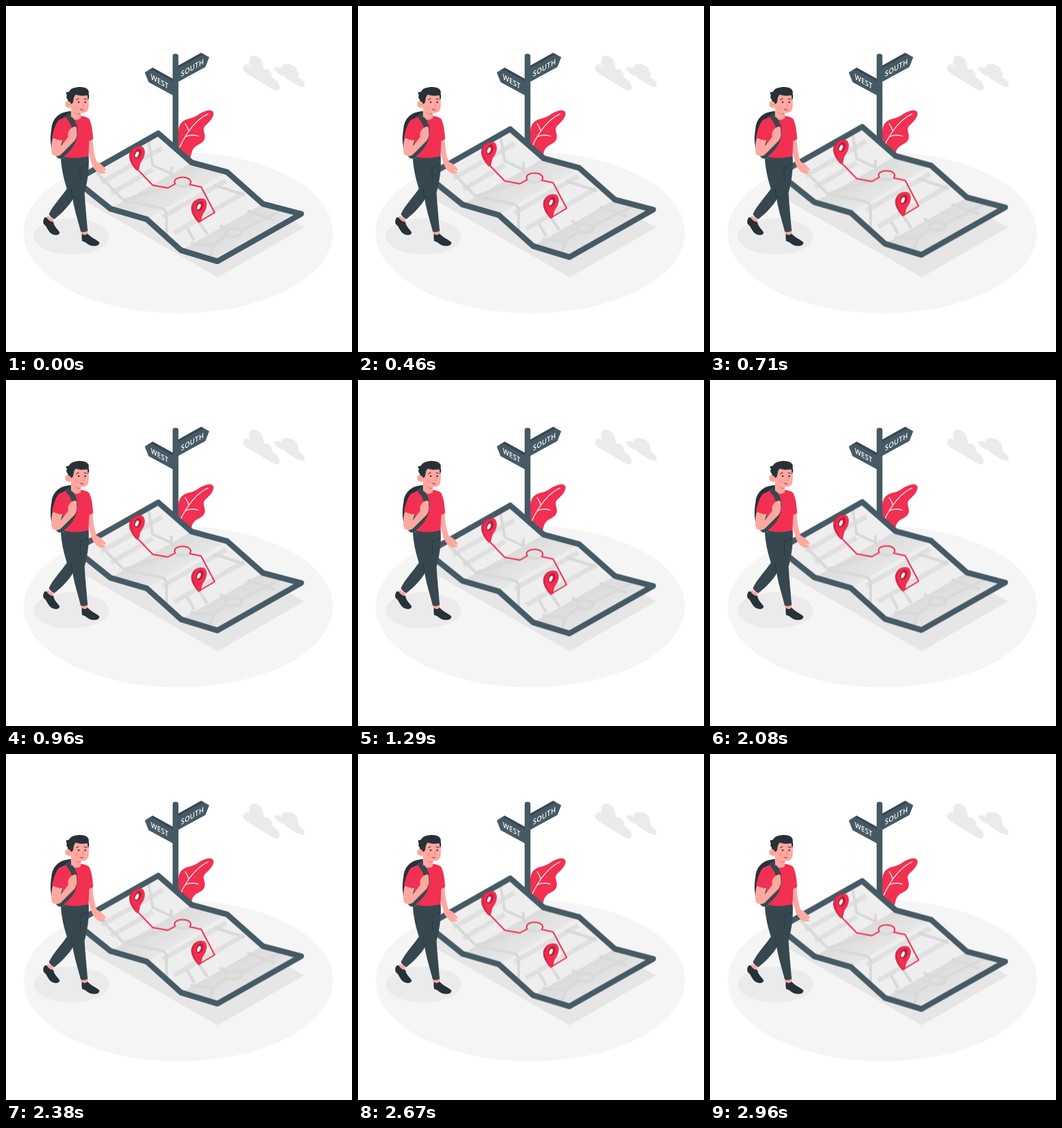
Animation, 500 px wide and 500 px high, one loop 3 s. Source, as an HTML page:

```html
<!DOCTYPE html>
<html lang="en">
<head>
<meta charset="utf-8">
<title>Traveller and map</title>
<style>
  :root {
    --red: #f23051;
    --wine: #b8203e;
    --slate: #455a64;
    --dark: #37474f;
    --ink: #263238;
    --skin: #ffa8a0;
    --blush: #f28f8f;
  }
  html, body { margin: 0; width: 100%; height: 100%; overflow: hidden; background: #fff; }
  svg { display: block; width: 100%; height: 100%; }
  .line { fill: none; stroke-linecap: round; stroke-linejoin: round; }
  .roads { stroke: #d9d9d9; stroke-width: 4; stroke-linecap: butt; }
  .avenues { stroke: #e0e0e0; stroke-width: 7; stroke-linecap: butt; }
  .route { stroke: var(--red); stroke-width: 2; }
  .border { stroke: var(--slate); stroke-width: 8.2; }
  .veins { stroke: #fff; stroke-width: 1.2; }
  .face-line { stroke: var(--ink); stroke-width: 1; }
  .crease { stroke: var(--ink); stroke-width: .8; }
  .red { fill: var(--red); }
  .slate { fill: var(--slate); }
  .dark { fill: var(--dark); }
  .ink { fill: var(--ink); }
  .skin { fill: var(--skin); }
  .cloud { fill: #ebebeb; }
  text { font: 600 10.8px "Open Sans", "Noto Sans", sans-serif; letter-spacing: .3px; fill: #fff; }

  #map { animation: float 1.5s linear infinite; }
  @keyframes float {
    50% { transform: translateY(-10px); }
  }
</style>
</head>
<body>
<svg viewBox="0 0 500 500">
  <defs>
    <linearGradient id="foldNear" gradientUnits="userSpaceOnUse" x1="209" y1="259" x2="236" y2="306">
      <stop offset="0" stop-color="#dcdcdc"/>
      <stop offset="1" stop-color="#ebebeb"/>
    </linearGradient>
    <linearGradient id="foldFar" gradientUnits="userSpaceOnUse" x1="312" y1="319" x2="340" y2="367">
      <stop offset="0" stop-color="#dcdcdc"/>
      <stop offset="1" stop-color="#e9e9e9"/>
    </linearGradient>
    <path id="sheet" d="M100 252L220 184L268.500 226.300L319.500 240L371.300 286L426.500 300.500L305.500 369L253 353L203.500 308.200L151 293Z"/>
    <g id="pin">
      <path fill="#d92849" d="M189 238C181 230 176 220 178.800 212C182 204.500 190 200.500 197 203.500L199 206L192 236Z"/>
      <path class="red" d="M190 238C185 229 179.500 220 182.500 212C185.500 205 193 201 198 204C202 208 201 216 198 221C194.500 226.500 191 231 190 238Z"/>
      <ellipse fill="var(--wine)" cx="190.500" cy="213.500" rx="5" ry="7.600" transform="rotate(24 190.500 213.500)"/>
      <ellipse fill="#fff" cx="189.300" cy="214.500" rx="2.200" ry="4.400" transform="rotate(24 189.300 214.500)"/>
    </g>
  </defs>

  <!-- Ground -->
  <ellipse cx="249" cy="327.500" rx="223.500" ry="116.500" fill="#f5f5f5"/>
  <ellipse cx="94.500" cy="333" rx="54.500" ry="26" fill="#ebebeb"/>
  <path fill="#e6e6e6" d="M95 271L220 200L430.500 320L306 392Z"/>

  <!-- Clouds -->
  <path class="cloud" d="M343 91C342 84 348 83 352 86C350 77 353 70 361 72C369 74 372 84 373 92C379 90 385 95 385 104C392 107 397 115 395 121C392 124 385 120 380 117L347 97C344 95 343 93 343 91Z"/>
  <path class="cloud" d="M388 89C391 87 395 88 398 91C397 86 402 83 408 84C418 85 424 93 423 104C428 106 432 110 431.500 115C430 119 424 116 420 114L405 105C403 101 399 101 396 99C391 97 388 93 388 89Z"/>

  <!-- Leaf -->
  <path class="red" d="M249 222L249 182C249 172 254 165 264 163C275 161 280 154 288 152C294 150 300 150 300 156C299 163 293 168 287 174C283 179 289 185 287 192C285 199 275 200 271 206C268 210 268 216 265 222Z"/>
  <path class="line veins" d="M251 204C259 187 272 165 292 156M264 181Q263 176 259 170M259 189Q268 185 278 188"/>

  <!-- Signpost -->
  <path class="slate" d="M240.800 72Q241 69 245 69Q249 69 249.200 72V215H240.800Z"/>
  <path class="dark" d="M249 86L282 67.500L293.500 74L288 88L249 109Z"/>
  <path class="slate" d="M249 89.500L284 70.500L293.500 74L288 88L249 109.500Z"/>
  <path class="dark" d="M200.500 96L212 89L241 105V110L211 93Z"/>
  <path class="slate" d="M200.500 96L211 92.500L241 109V129L206 110Z"/>
  <text transform="matrix(.87 -.5 0 1 252.800 102.500)">SOUTH</text>
  <text transform="matrix(.87 .5 0 1 209.300 105.500)">WEST</text>

  <g id="map">
    <use href="#sheet" fill="#eee"/>
    <path fill="url(#foldNear)" d="M268.500 226.300L319.500 240L203.500 308.200L151 293Z"/>
    <path fill="url(#foldFar)" d="M371.300 286L426.500 300.500L305.500 369L253 353Z"/>
    <path class="line avenues" d="M138 255L226 205M152 271L212 236M226 305L318 252M243 328L344 270"/>
    <g class="line roads">
      <path d="M131 241L170 281L224 292Q232 294 232 302V330"/>
      <path d="M206 195L212 230L238 242L245 249M239 232V244"/>
      <path d="M170 281L244 258M262 321L272 339M278 311L291 330M301 259L345 273"/>
      <path d="M309 317L320 323M340 324L398 295M349 296L389 310M318 333L300 345L295 362M267 343L300 346"/>
      <ellipse cx="328.500" cy="327.500" rx="11.500" ry="6"/>
      <path d="M244 256C246 262 263 262 266 257"/>
    </g>
    <use href="#sheet" class="line border"/>
    <path class="line route" d="M190 236L212 259L234 263L244.500 257C241 251 248 247.500 255 247.500C263 247.500 270 252 265.500 258L282 261.500L301.500 298.500L279 312"/>
    <use href="#pin"/>
    <use href="#pin" x="89.500" y="75.500"/>
  </g>

  <g id="traveller">
    <!-- Backpack -->
    <path class="dark" d="M97 152C80 151 68 160 66 176C63 190 64 205 69 213L80 220L100 208L102 160Z"/>
    <path class="ink" d="M93 153C78 153 67 162 66 177C65 189 64 200 67 209L73 205C70 190 72 172 80 163Z"/>

    <!-- Legs -->
    <path class="skin" d="M60 303L69 308L67 314L58 310Z"/>
    <path class="skin" d="M108 323L117.500 322L118.500 331L109 332Z"/>
    <path class="ink" d="M55.500 306Q58.500 304 60.500 308Q64 312 68.500 312C69.500 319 74.500 322 77.500 327C77.500 331 72.500 332 67.500 330C60.500 327 60 319 54.500 315Q52.500 311 55.500 306Z"/>
    <path class="ink" d="M110 329Q113.500 333 118 329C122 334 130.500 337.500 135 341.500C135 346.500 129 347.500 124 346.500C118 345.500 116 341 110 339.500Q108.500 334 110 329Z"/>
    <path class="dark" d="M79 217C80 237 84 251 88 264C80 276 67 289 62 301Q65 306 70 308C81 299 92 288 98 277L113 240Z"/>
    <path class="dark" d="M80 217L119.500 217C120.500 234 118.500 250 113.500 270C114.500 288 116.500 307 118 325Q113 328 108 326C104 309 98 293 96 276C92 258 90 240 87 223Z"/>
    <path class="line crease" d="M118 229Q108 230 107 236Q107 246 108 252M96 278L94 264"/>

    <!-- Far arm -->
    <path class="skin" d="M117 190L125 191C126 203 127 214 131 225C138 228 142.500 233 144.500 237C143.500 239 141 237.500 139 237L144 240.500C142 243.500 133 242.500 130 238C125 233 123 227 121 218Z"/>

    <!-- Neck and shirt -->
    <path class="red" d="M95 160C85 160 76 163 73 170C69 179 67 186 67 190Q74 194 82 194V217C93 221 109 220 119.500 217L120 195Q124 194 126 192C125 181 124 170 120 163Q115 159 108 159Z"/>
    <path class="skin" d="M94 148L108 150V162Q101 168 94 160Z"/>
    <path fill="var(--blush)" d="M97 153Q102 157 108 154V158Q101 158 97 153Z"/>

    <!-- Straps and near arm -->
    <path class="dark" d="M90 159L96 161C101.500 167 104.500 177 103 188C100 203 90 214 77 221L72 217C85 211 95 199 97 187C97 177 93 168 87 162Z"/>
    <path class="skin" d="M68 189L82 193L79 203L90 189C88 183 92 177 97 175C100 173 103 175 102 179C103 184 103 190 99 195L79 215Q73 219 67 215C64 207 66 196 68 189Z"/>
    <path class="red" d="M77 164C71 171 68 181 67 190Q74 194 82 194C85 185 90 176 87 168Z"/>

    <!-- Head -->
    <path class="skin" d="M93 134L95 125L118 127C120.500 137 120 147 118 151C115 156 105 155 99 152L94 148Z"/>
    <path class="ink" d="M94 142Q89 139 89 135C87 133 87 131 88 129L86.500 125Q89 124 91 124C93 119 100 117 107 117C116 117 121 121 119.500 127Q121 132 118.500 136L117.500 129Q107 131 101 128C97 131 98 137 96.500 140Z"/>
    <path class="skin" d="M94 141C91 135.500 86 137 85.500 141C85.500 146 89 148.500 95 147Z"/>
    <circle class="ink" cx="105" cy="139" r="1.200"/>
    <circle class="ink" cx="114.500" cy="139" r="1.200"/>
    <path class="line face-line" d="M101.500 135.500L105 133.800M113 134L116.500 135"/>
    <path class="line" stroke="var(--blush)" d="M111 140L112.500 145L109.500 145.500M88 141Q91 142 91 145"/>
    <path class="line" stroke="var(--wine)" d="M107 149Q109 151 112 150"/>
    <circle cx="102" cy="146" r="2.200" fill="var(--blush)" opacity=".45"/>
  </g>
</svg>
</body>
</html>
```
